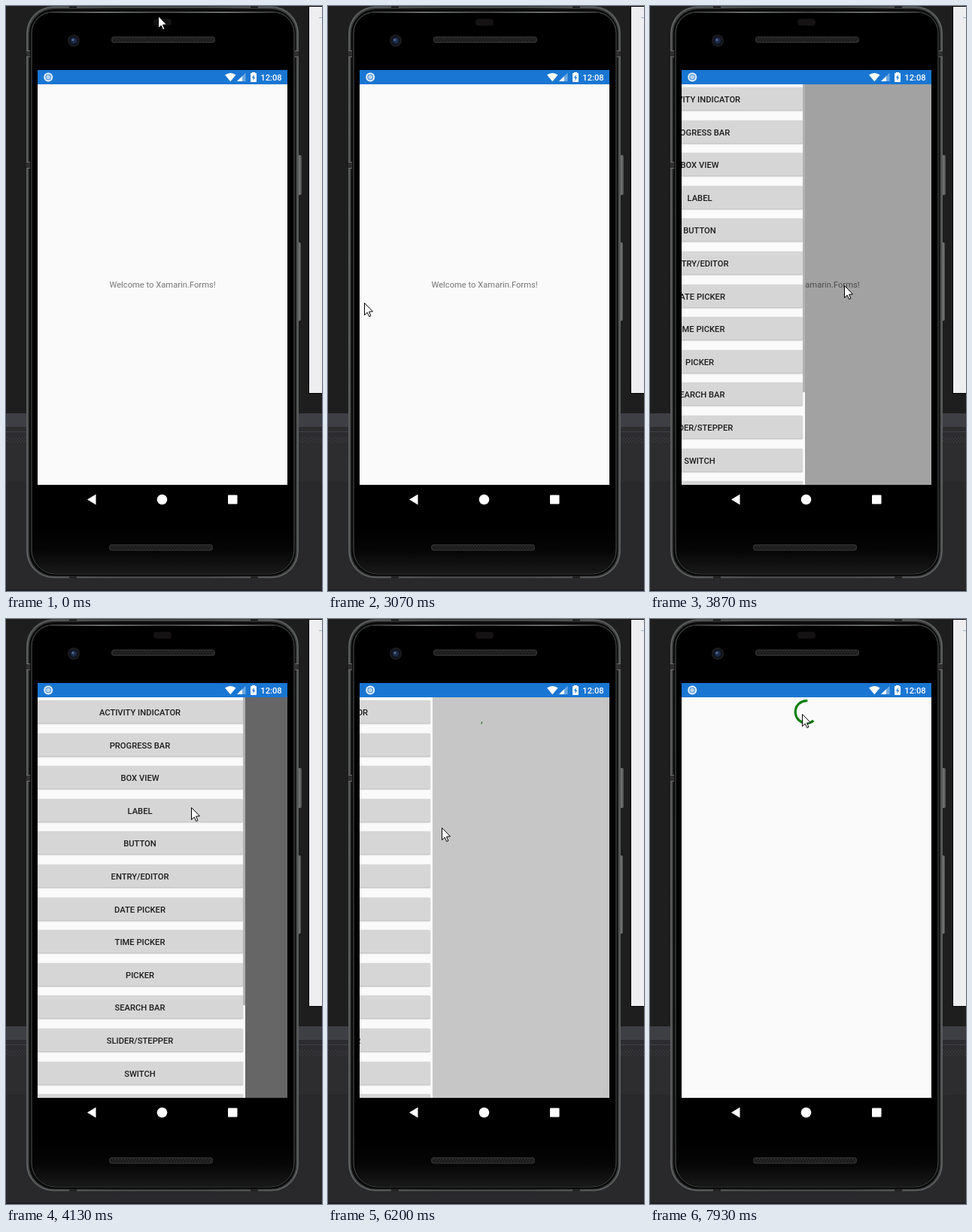
These frames come from a looping animation (420x777 px, 8000 ms). An HTML page with a canvas:

```html
<!DOCTYPE html>
<html lang="en">
<head>
<meta charset="utf-8">
<title>Drawer demo</title>
<style>
  html, body { margin: 0; width: 420px; height: 777px; overflow: hidden; background: #1e1e1e; }
  canvas { display: block; }
</style>
</head>
<body>
<canvas id="stage" width="420" height="777"></canvas>
<script>
const W = 420, H = 777, LOOP = 8000, STEP = 200 / 3;
const SCREEN = { x: 42, y: 104, w: 332, h: 532 };
const DRAWER_W = 280, ROW_H = 43.6;
const PAGE_SWITCH = 5100;
const LABELS = ['ACTIVITY INDICATOR', 'PROGRESS BAR', 'BOX VIEW', 'LABEL', 'BUTTON', 'ENTRY/EDITOR',
  'DATE PICKER', 'TIME PICKER', 'PICKER', 'SEARCH BAR', 'SLIDER/STEPPER', 'SWITCH', ''];

// [time, x, y] of the pointer tip
const POINTER = [
  [70, 202, 13], [270, 196, 100], [470, 176, 235], [630, 163, 345], [780, 172, 386], [930, 193, 381],
  [1130, 192, 381], [1400, 192, 381], [1600, 155, 380], [1800, 124, 359], [1935, 190, 292],
  [2070, 309, 340], [2200, 235, 430], [2270, 166, 435], [2470, 95, 420], [2870, 50, 395],
  [3070, 48, 394], [3200, 48, 394], [3670, 190, 398], [3870, 258, 370], [4000, 264, 315],
  [4130, 246, 251], [4400, 222, 160], [4650, 207, 123], [5100, 207, 123], [5470, 278, 285],
  [5800, 353, 288], [5870, 353, 288], [6130, 205, 280], [6333, 65, 271], [6400, 58, 269],
  [6730, 227, 237], [7000, 218, 195], [7300, 188, 127], [7600, 200, 124], [7700, 202, 126]
];
// [time, right edge of the drawer]
const EDGE = [[3200, 42], [3667, 139], [3870, 207], [4000, 285], [4130, 318], [4200, 322],
  [5900, 322], [6130, 193], [6333, 53], [6430, 42]];

const stage = document.getElementById('stage').getContext('2d');
const clamp = (v, lo = 0, hi = 1) => Math.min(hi, Math.max(lo, v));

// Monotone cubic interpolation through one column of a key list
function track(keys, t, col) {
  const last = keys.length - 1;
  if (t <= keys[0][0]) return keys[0][col];
  if (t >= keys[last][0]) return keys[last][col];
  const i = keys.findIndex(k => k[0] > t) - 1;
  const slope = j => (keys[j + 1][col] - keys[j][col]) / (keys[j + 1][0] - keys[j][0]);
  const tangent = j => {
    if (j === 0 || j === last) return 0;
    const a = slope(j - 1), b = slope(j);
    return a * b <= 0 ? 0 : 2 * a * b / (a + b);
  };
  const h = keys[i + 1][0] - keys[i][0], s = (t - keys[i][0]) / h, r = 1 - s;
  return keys[i][col] * r * r * (1 + 2 * s) + keys[i + 1][col] * s * s * (3 - 2 * s)
    + h * s * r * (tangent(i) * r - tangent(i + 1) * s);
}

// cubic-bezier(.4, 0, .2, 1)
function ease(x) {
  let lo = 0, hi = 1;
  for (let i = 0; i < 20; i++) {
    const s = (lo + hi) / 2, r = 1 - s;
    if (1.2 * r * r * s + 0.6 * r * s * s + s ** 3 < x) lo = s; else hi = s;
  }
  return lo * lo * (3 - 2 * lo);
}

function rect(c, color, x, y, w, h) {
  c.fillStyle = color;
  c.fillRect(x, y, w, h);
}

function round(c, color, x, y, w, h, r) {
  c.fillStyle = color;
  c.beginPath();
  c.roundRect(x, y, w, h, r);
  c.fill();
}

function disc(c, color, x, y, r) {
  c.fillStyle = color;
  c.beginPath();
  c.arc(x, y, r, 0, 2 * Math.PI);
  c.fill();
}

function poly(c, color, ...pts) {
  c.fillStyle = color;
  c.beginPath();
  for (let i = 0; i < pts.length; i += 2) c.lineTo(pts[i], pts[i + 1]);
  c.closePath();
  c.fill();
}

function text(c, str, x, y, color, weight, align = 'center') {
  c.font = `${weight} 11.2px Roboto, sans-serif`;
  c.textAlign = align;
  c.fillStyle = color;
  c.fillText(str, x, y);
}

function gradient(c, x0, y0, x1, y1, ...colors) {
  const g = c.createLinearGradient(x0, y0, x1, y1);
  colors.forEach((color, i) => g.addColorStop(i / (colors.length - 1), color));
  return g;
}

function outline(c, color, x, y, w, h, r) {
  c.strokeStyle = color;
  c.lineWidth = 1;
  c.beginPath();
  c.roundRect(x, y, w, h, r);
  c.stroke();
}

function drawDesktop(c) {
  rect(c, '#1e1e1e', 0, 0, W, H);
  rect(c, '#3e3e45', 0, 541, W, 18);
  rect(c, '#2d2d30', 0, 559, W, 218);
  rect(c, '#3f3f46', 0, 565, W, 1);
  for (let y = 573; y < 580; y += 2)
    for (let x = y % 4; x < W; x += 4) rect(c, '#46464a', x, y, 1, 1);
  rect(c, '#29292c', 0, 632, W, 145);
  rect(c, '#1f1f22', 0, 775, W, 2);
  rect(c, '#000', 402, 0, 18, 515);
  rect(c, '#eeeef0', 403, 1, 17, 513);
  rect(c, '#9db4c0', 416, 15, 4, 1);
}

function drawSpeaker(c, x, y) {
  round(c, '#303030', x, y, 138, 8.5, 4);
  round(c, '#1b1b1b', x + 1.5, y + 1.5, 135, 5.5, 3);
  for (let i = 0; i < 33; i++) {
    rect(c, '#303030', x + 4 + i * 4, y + 2, 1, 2);
    rect(c, '#303030', x + 6 + i * 4, y + 4, 1, 2);
  }
}

function drawPhone(c) {
  round(c, gradient(c, 386, 0, 394, 0, '#222', '#777', '#3a3a3a'), 386, 198, 7, 53, 2);
  round(c, gradient(c, 386, 0, 393, 0, '#222', '#777', '#3a3a3a'), 386, 314, 6, 104, 2);
  round(c, gradient(c, 27, 0, 389, 0, '#454747', '#222', '#222', '#454747'), 27, 0, 362, 760, [36, 36, 36, 36]);
  outline(c, '#707373', 28, 1.5, 360, 757.5, 35);
  round(c, '#0b0b0b', 30.5, 4, 355, 753, 33);
  outline(c, '#4d5150', 34, 8, 349, 746, [28, 28, 32, 32]);
  round(c, '#000', 35, 9.5, 347, 744, [27, 27, 31, 31]);
  round(c, gradient(c, 0, 690, 0, 754, '#000', '#050505', '#191919'), 35, 690, 347, 63, [0, 0, 31, 31]);
  rect(c, gradient(c, 45, 0, 375, 0, '#222', '#9a9e9d', '#555', '#9a9e9d', '#222'), 55, 8, 306, 1);

  for (const [x, y] of [[27, 59], [384, 59], [27, 207]]) {
    rect(c, '#6b6b6b', x, y, 5, 1);
    rect(c, '#303030', x, y + 1, 5, 7);
    rect(c, '#6b6b6b', x, y + 8, 5, 1);
  }
  for (const x of [84, 325]) {
    rect(c, '#222', x, 0, 10, 3);
    rect(c, '#222', x, 757, 10, 3);
  }

  round(c, '#151213', 196, 17, 24, 9, 4);
  drawSpeaker(c, 140, 40.5);
  drawSpeaker(c, 137, 715);
  disc(c, '#1c1c20', 90, 46, 8);
  disc(c, '#10131c', 90, 46, 6);
  disc(c, '#1c2b4a', 90, 46, 4);
  disc(c, '#5a7096', 89, 45, 1.6);

  poly(c, '#fff', 108, 655.5, 119.5, 648.5, 119.5, 662.5);
  disc(c, '#fff', 207.5, 655.5, 6.8);
  round(c, '#fff', 295, 649.5, 12.5, 12, 1);
}

function drawStatusBar(c) {
  rect(c, '#1976d2', 42, 85, 332, 19);
  disc(c, '#e8f1fa', 56.2, 94.5, 6);
  disc(c, '#5b9cdf', 56.2, 94.5, 4);
  disc(c, '#b9d5f1', 56.2, 94.5, 2.7);
  c.fillStyle = '#fff';
  c.beginPath();
  c.moveTo(298.3, 100.3);
  c.lineTo(291, 91.5);
  c.quadraticCurveTo(298.3, 86.5, 305.6, 91.5);
  c.closePath();
  c.fill();
  poly(c, '#6ea8e2', 307, 100, 318.5, 100, 318.5, 88.8);
  poly(c, '#fff', 307, 100, 314, 100, 314, 93.3);
  rect(c, '#fff', 327, 88, 4, 2);
  round(c, '#fff', 325, 89, 8, 12, 1);
  poly(c, '#1976d2', 329.8, 91, 327, 95.6, 328.8, 95.6, 328.2, 99.3, 331.2, 94.6, 329.4, 94.6);
  text(c, '12:08', 338.3, 99, '#fff', 500, 'left');
}

function drawSpinner(c, t) {
  const cycle = 4000 / 3;
  const p = ((t - 6234) / cycle % 1 + 1) % 1;
  const turn = 115.5 + (t - 7930) * 720 / 4444 + 90 * p - 90;
  const from = turn + 270 * ease(clamp(2 * p - 1));
  const to = Math.max(from + 4, turn + 270 * ease(clamp(2 * p)));
  c.strokeStyle = '#0a800a';
  c.lineWidth = 3.2;
  c.beginPath();
  c.arc(208, 123.5, 14.8, from * Math.PI / 180, to * Math.PI / 180);
  c.stroke();
}

function drawDrawer(c, t, edge) {
  const left = edge - DRAWER_W;
  rect(c, '#fafafa', left, SCREEN.y, DRAWER_W, SCREEN.h);
  LABELS.forEach((label, i) => {
    const y = Math.round(108 + i * ROW_H);
    const pressed = i === 0 ? clamp((t - 4960) / 90) * clamp((5330 - t) / 200) : 0;
    const tone = Math.round(214 - 30 * pressed);
    round(c, 'rgba(0,0,0,.09)', left + 1.5, y, 276, 32.2, 2.5);
    round(c, 'rgba(0,0,0,.13)', left + 2, y, 275, 31.2, 2);
    round(c, `rgb(${tone},${tone},${tone})`, left + 2, y - 0.3, 275, 30.3, 2);
    text(c, label, left + 140, y + 20, '#1c1c1c', 500);
  });
  c.globalAlpha = clamp((5180 - t) / 250);
  rect(c, '#b2b2b2', edge - 3, SCREEN.y, 3, 409);
  c.globalAlpha = 1;
}

function drawScreen(c, t) {
  const edge = Math.round(track(EDGE, t, 1));
  const open = (edge - SCREEN.x) / DRAWER_W;
  c.save();
  c.beginPath();
  c.rect(SCREEN.x, SCREEN.y, SCREEN.w, SCREEN.h);
  c.clip();
  rect(c, '#fafafa', SCREEN.x, SCREEN.y, SCREEN.w, SCREEN.h);
  if (t < PAGE_SWITCH) text(c, 'Welcome to Xamarin.Forms!', 208, 374, '#757575', 400);
  else drawSpinner(c, t);
  if (open > 0) {
    rect(c, `rgba(0,0,0,${0.6 * open})`, SCREEN.x, SCREEN.y, SCREEN.w, SCREEN.h);
    drawDrawer(c, t, edge);
  }
  c.restore();
}

function drawPointer(c, t) {
  c.save();
  c.translate(Math.round(track(POINTER, t, 1)) + 0.5, Math.round(track(POINTER, t, 2)) + 0.5);
  poly(c, '#fff', 0, 0, 0, 16, 3.7, 12.6, 6.2, 18, 8.4, 17, 6, 11.6, 11, 11.3);
  c.strokeStyle = '#000';
  c.lineWidth = 1;
  c.stroke();
  c.restore();
}

const backdrop = document.createElement('canvas');
backdrop.width = W;
backdrop.height = H;
const back = backdrop.getContext('2d');
drawDesktop(back);
drawPhone(back);
drawStatusBar(back);

function frame() {
  const t = Math.floor((performance.now() % LOOP + 4) / STEP) * STEP % LOOP;
  stage.drawImage(backdrop, 0, 0);
  drawScreen(stage, t);
  drawPointer(stage, t);
  requestAnimationFrame(frame);
}
frame();
</script>
</body>
</html>
```
